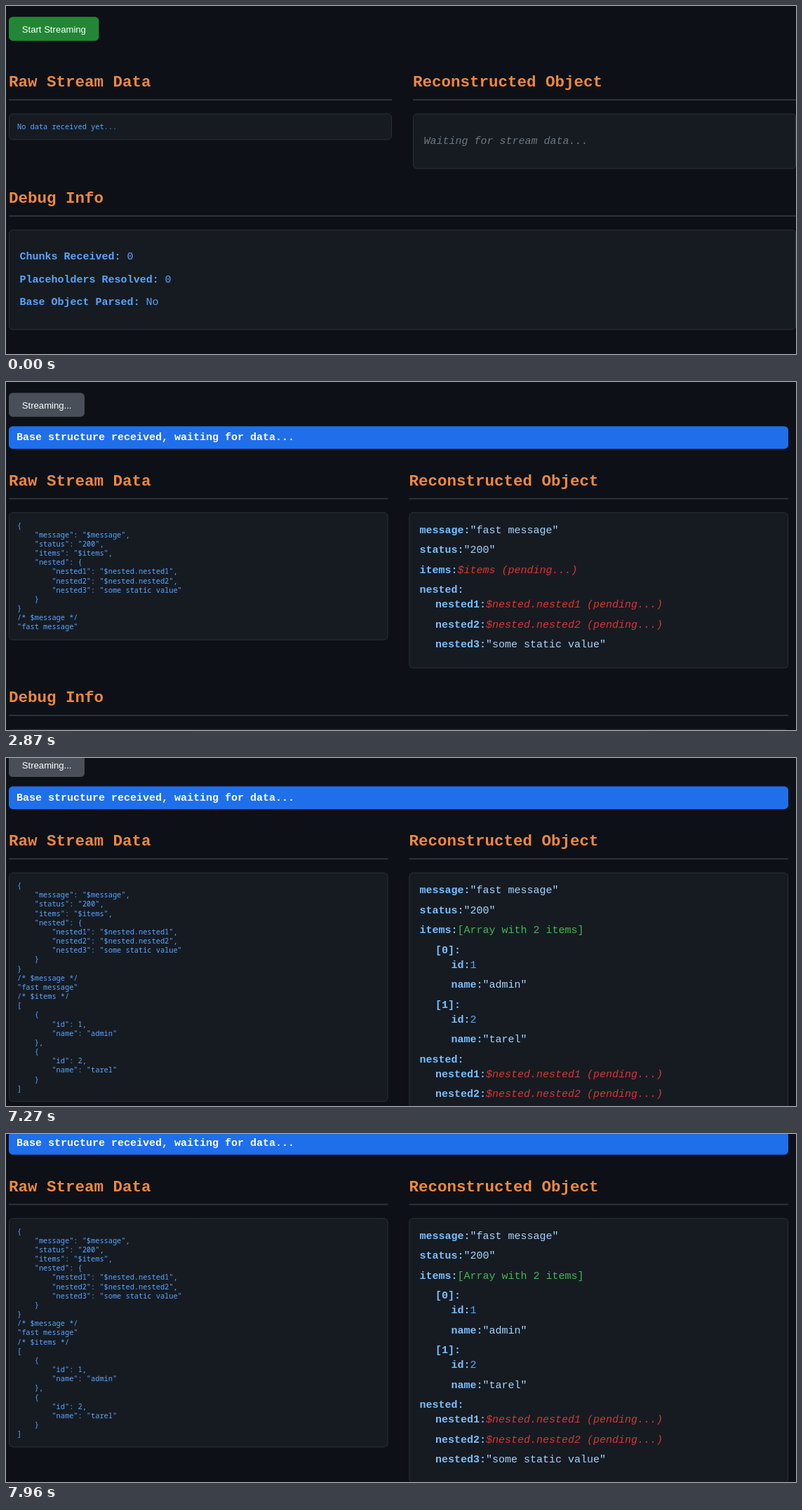
An HTML page with a canvas for the animation above (8000 ms loop, 1126 by 497 pixels).

```html
<!DOCTYPE html>
<html lang="en">
<head>
<meta charset="utf-8">
<title>Stream viewer</title>
<style>
  html, body { margin: 0; width: 100%; height: 100%; overflow: hidden; background: #0d1117; }
  canvas { display: block; }
</style>
</head>
<body>
<canvas id="stage" width="1126" height="497"></canvas>
<script>
const ctx = document.getElementById('stage').getContext('2d');
const W = 1126, H = 497, LOOP = 8000;
const CLICK = 1140, ITEMS = 6260, SCROLL = 6850;
const LEFT = 4, GAP = 30, RADIUS = 5.6;
const MONO = '"Liberation Mono", monospace';
const CODE = '10.31px "Noto Sans Mono", monospace';
const SANS = '13.125px "Liberation Sans", sans-serif';
const BODY = `15px ${MONO}`, BOLD = `bold ${BODY}`, ITALIC = `italic ${BODY}`;
const CODE_LINE = 13.17;

const BLUE = '#58a6ff', KEY = '#79c0ff', STRING = '#a5d6ff', PENDING = '#da3633', ARRAY = '#3fb950';
const GREEN = [35, 134, 54], HOVER = [46, 160, 67], GRAY = [72, 79, 88];

const baseLines = `{
    "message": "$message",
    "status": "200",
    "items": "$items",
    "nested": {
        "nested1": "$nested.nested1",
        "nested2": "$nested.nested2",
        "nested3": "some static value"
    }
}
/* $message */
"fast message"`.split('\n');

const itemLines = `/* $items */
[
    {
        "id": 1,
        "name": "admin"
    },
    {
        "id": 2,
        "name": "tarel"
    }
]`.split('\n');

// Rows of the object view: indent, key, value, colour
const pending = path => `$${path} (pending...)`;
const headRows = [[0, 'message', '"fast message"', STRING], [0, 'status', '"200"', STRING]];
const waitingRows = [[0, 'items', pending('items'), PENDING]];
const itemRows = [
  [0, 'items', '[Array with 2 items]', ARRAY],
  [1, '[0]', '', STRING], [2, 'id', '1', BLUE], [2, 'name', '"admin"', STRING],
  [1, '[1]', '', STRING], [2, 'id', '2', BLUE], [2, 'name', '"tarel"', STRING]
];
const nestedRows = [
  [0, 'nested', '', STRING],
  [1, 'nested1', pending('nested.nested1'), PENDING],
  [1, 'nested2', pending('nested.nested2'), PENDING],
  [1, 'nested3', '"some static value"', STRING]
];

const clamp = v => Math.min(1, Math.max(0, v));
const smooth = u => u * u * (3 - 2 * u);
const mix = (a, b, u) => `rgb(${a.map((v, i) => Math.round(v + (b[i] - v) * u))})`;

function text(str, x, y, font, color) {
  ctx.font = font;
  ctx.fillStyle = color;
  ctx.fillText(str, x, y);
}

function fillRound(x, y, w, h, color) {
  ctx.beginPath();
  ctx.roundRect(x, y, w, h, RADIUS);
  ctx.fillStyle = color;
  ctx.fill();
}

function panel(x, y, w, h) {
  fillRound(x, y, w, h, '#161b22');
  ctx.beginPath();
  ctx.roundRect(x + 0.5, y + 0.5, w - 1, h - 1, RADIUS - 0.5);
  ctx.strokeStyle = '#2a3037';
  ctx.lineWidth = 1;
  ctx.stroke();
}

// Heading with its rule; y is the top of the rule
function heading(str, x, y, w) {
  text(str, x, y - 18.1, `bold 22.5px ${MONO}`, '#f0883e');
  ctx.fillStyle = '#30363d';
  ctx.fillRect(x, y, w, 1.8);
}

function button(t) {
  const started = t >= CLICK;
  const color = started ? mix(HOVER, GRAY, clamp((t - CLICK) / 200))
                        : mix(GREEN, HOVER, clamp((t - 400) / 200));
  fillRound(LEFT, 15.5, started ? 108 : 128.4, 34.2, color);
  text(started ? 'Streaming...' : 'Start Streaming', 22.8, 37.5, SANS, '#fff');
}

function rawPanel(lines, y, w) {
  panel(LEFT, y, w, 24.4 + lines.length * CODE_LINE);
  lines.forEach((line, i) => text(line, 16, y + 22.4 + i * CODE_LINE, CODE, BLUE));
}

// Returns the bottom edge of the panel
function objectPanel(rows, x, y, w) {
  const step = row => row[2] ? 28.5 : 21;
  const h = rows.reduce((sum, row) => sum + step(row), 0) + 30.7;
  panel(x, y, w, h);
  let base = y + 29.7;
  for (const row of rows) {
    const [indent, key, value, color] = row;
    const left = x + 15 + indent * 22.5;
    text(key + ':', left, base, BOLD, KEY);
    text(value, left + (key.length + 1) * 9, base, color === PENDING ? ITALIC : BODY, color);
    base += step(row);
  }
  return y + h;
}

function debugPanel(y, w, values) {
  heading('Debug Info', LEFT, y, w);
  panel(LEFT, y + 20.5, w, 143);
  ['Chunks Received:', 'Placeholders Resolved:', 'Base Object Parsed:'].forEach((label, i) => {
    const base = y + 63.2 + i * 32.5;
    text(label, 19.6, base, BOLD, BLUE);
    text(values[i], 19.6 + (label.length + 1) * 9, base, BODY, BLUE);
  });
}

function scrollAt(t) {
  if (t < SCROLL) return 0;
  const tick = t < 7690 ? SCROLL + 70 * Math.floor((t - SCROLL) / 70)
                        : 7690 + 90 * Math.floor((t - 7690) / 90);
  return 67 * smooth(clamp((tick - 6772) / 1278));
}

function draw(t) {
  const started = t >= CLICK, loaded = t >= ITEMS;
  const width = (started ? 1115 : W) - LEFT;
  const col = (width - GAP) / 2, right = LEFT + col + GAP;
  const rule = started ? 165.7 : 133.1, top = rule + 20.5;

  ctx.fillStyle = '#0d1117';
  ctx.fillRect(0, 0, W, H);
  ctx.save();
  ctx.translate(0, -scrollAt(t));

  button(t);
  heading('Raw Stream Data', LEFT, rule, col);
  heading('Reconstructed Object', right, rule, col);

  let bottom = top + 79;
  if (started) {
    fillRound(LEFT, 63.2, width, 32.3, '#1f6feb');
    text('Base structure received, waiting for data...', 15, 83.2, BOLD, '#fff');
    rawPanel(loaded ? [...baseLines, ...itemLines] : baseLines, top, col);
    const rows = [...headRows, ...(loaded ? itemRows : waitingRows), ...nestedRows];
    bottom = objectPanel(rows, right, top, col);
  } else {
    rawPanel(['No data received yet...'], top, col);
    panel(right, top, col, 79);
    text('Waiting for stream data...', right + 15.5, top + 43, ITALIC, '#6e7681');
  }
  const counts = loaded ? ['3', '2', 'Yes'] : started ? ['2', '1', 'Yes'] : ['0', '0', 'No'];
  debugPanel(bottom + 66.4, width, counts);
  ctx.restore();
}

const start = performance.now();
function frame() {
  draw((performance.now() - start) % LOOP);
  requestAnimationFrame(frame);
}
frame();
</script>
</body>
</html>
```
